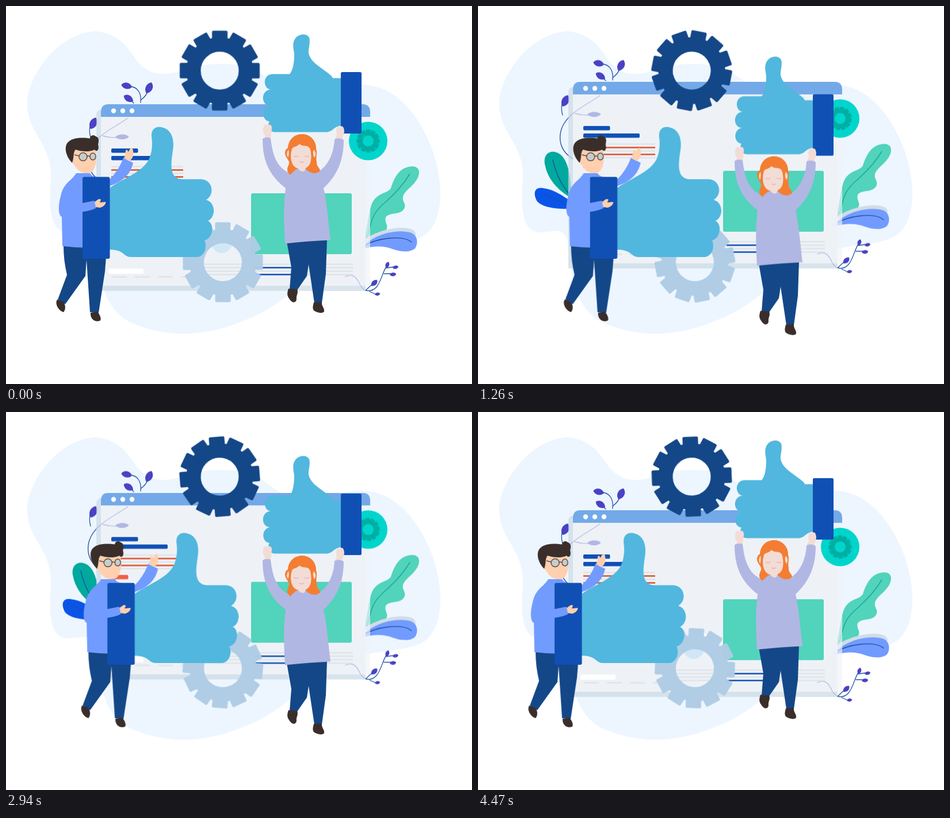
An HTML page that plays this animation: 810 px wide and 658 px high, repeating every 4.5 s.

```html
<!DOCTYPE html>
<html lang="en">
<head>
<meta charset="utf-8">
<title>Thumbs up</title>
<style>
  html, body { margin: 0; width: 100%; height: 100%; overflow: hidden; background: #fff; }
  svg { display: block; width: 810px; height: 658px; }
  svg * { animation-duration: 4.5s; animation-iteration-count: infinite; }
  .float, .push, .lift { animation-timing-function: cubic-bezier(.364, 0, .636, 1); }
  .float { animation-name: float; }
  .push { animation-name: push; }
  .lift { animation-name: lift; }
  .spin { animation-name: spin; animation-timing-function: linear; }
  .back { animation-direction: reverse; }
  @keyframes float {
    0%, 50%, 100% { transform: translateY(0); }
    20% { transform: translateY(-47px); }
    75% { transform: translateY(-45px); }
  }
  @keyframes push {
    0%, 50%, 100% { transform: translateX(0); }
    25%, 75% { transform: translateX(64px); }
  }
  @keyframes lift {
    0%, 50%, 100% { transform: translateY(0); }
    25%, 75% { transform: translateY(40px); }
  }
  @keyframes spin { to { transform: rotate(360deg); } }
  .navy { fill: #144788; }
  .royal { fill: #1050b5; }
  .hand { fill: #51b7de; }
  .mint { fill: #52d3bc; }
  .iris { fill: #729bff; }
  .lilac { fill: #b1b7e3; }
  .skin { fill: #ffcfae; }
  .pale { fill: #f3dcd6; }
  .dark { fill: #3a2e2b; }
  .bud { fill: #4a42c4; }
  .stem { fill: none; stroke: #1c4fa6; stroke-width: 1.3; stroke-linecap: round; }
  .faint { stroke: #b6bde4; }
  .grey { stroke: #dfe5e8; stroke-width: 2.6; }
  .red { stroke: #dd5029; stroke-width: 2.6; }
  .blue { stroke: #1050b5; stroke-width: 2.6; }
</style>
</head>
<body>
<svg viewBox="0 0 810 658">
  <defs>
    <g id="gear"></g>
    <path id="bud" d="M0 0C-6 -4 -7 -14 1 -19C9 -14 7 -4 0 0Z"/>
  </defs>

  <path fill="#edf6ff" d="M155 44C190 46 210 68 223 89C243 120 272 124 305 112C340 99 395 96 430 110C455 121 480 150 515 155C550 155 575 139 612 137C668 134 710 178 735 235C760 292 765 368 730 397C698 424 610 408 555 450C510 482 482 520 420 545C350 576 280 580 215 550C180 533 163 490 160 440C157 375 136 395 105 394C75 390 75 350 78 300C80 240 40 225 37 175C33 130 85 48 155 44Z"/>

  <g class="float">
    <g class="bud">
      <path class="stem" d="M234 168C236 152 229 140 214 140M234 164Q245 156 247 146M222 169L212 160M163 228C136 252 134 288 168 307M147 229Q143 215 148 203"/>
      <use href="#bud" transform="translate(219 141) rotate(-82)"/>
      <use href="#bud" transform="translate(221 166) rotate(-62)"/>
      <use href="#bud" transform="translate(244 152) rotate(22) scale(1.1)"/>
      <use href="#bud" transform="translate(147 214) rotate(22) scale(1.15)"/>
      <path fill="#00a99d" d="M162 373C139 361 121 339 117 318C112 300 122 291 133 293C154 297 161 325 163 373Z"/>
      <path fill="#0a55e8" d="M160 392C137 393 111 390 102 378C95 364 99 354 112 356C132 358 146 369 160 378Z"/>
      <path class="stem" d="M130 307Q138 343 160 368M115 367Q132 376 158 384"/>
      <path class="mint" d="M616 421C628 400 628 365 636 344C645 324 663 327 669 317C674 301 683 281 703 279.500C717 278 720 287 717 296C711 313 693 320 690 332C688 341 697 344 692 353C685 365 666 358 660 368C657 377 667 383 660 391C650 401 632 398 616 421Z"/>
      <path fill="none" stroke="#1aab98" stroke-width="1.5" d="M620 415C640 385 625 370 660 341Q688 316 702 292"/>
      <path fill="#d0dde8" d="M616 412C640 390 690 380 708 390Q714 395 711 400Z"/>
      <path class="iris" d="M615 424C637 397 680 387 705 395C717 401 716 415 711 422C700 431 682 427 666 421C647 416 632 419 615 424Z"/>
      <path class="stem" d="M617 420C645 403 690 398 705 411"/>
      <path class="stem" d="M616 486Q620 493 625 495C650 501 652 466 661 454M625 495L638 483M632 497L645 503M657 466L671 466M661 456L675 454"/>
      <use href="#bud" transform="translate(635 487) rotate(42) scale(.75)"/>
      <use href="#bud" transform="translate(641 502) rotate(80) scale(.5)"/>
      <use href="#bud" transform="translate(661 456) rotate(15) scale(.6)"/>
      <use href="#bud" transform="translate(672 456) rotate(72) scale(.55)"/>
      <use href="#bud" transform="translate(667 468) rotate(78) scale(.6)"/>
    </g>

    <path fill="#cddbe6" opacity=".75" d="M157 190Q157 180 168 180H625V496H157Z"/>
    <path fill="#f1f4f9" opacity=".68" d="M165 193H633V487H165Z"/>
    <path fill="#f0f3f9" opacity=".75" d="M165 193H625V487H165Z"/>
    <path fill="#73a9e8" d="M165 193V185Q165 171 178 171H620Q633 171 633 185V193Z"/>
    <path class="stem faint" d="M212 195C192 209 176 216 163 228M168 226Q186 231 202 228M590 471C604 464 610 474 616 486"/>
    <use href="#bud" class="lilac" transform="translate(190 228) rotate(87) scale(.8 1.25)"/>
    <g fill="#fff">
      <circle cx="187" cy="182.500" r="4.200"/>
      <circle cx="203" cy="182.500" r="4.200"/>
      <circle cx="219" cy="182.500" r="4.200"/>
      <rect x="178" y="457" width="61" height="9" rx="2"/>
    </g>
    <rect class="royal" x="183" y="248" width="46.500" height="7.500" rx="2"/>
    <rect class="royal" x="183" y="261" width="98" height="7.500" rx="2"/>
    <path class="grey" d="M183 279.500H308M183 291.500H308M183 303H308M345 449.500H603M345 455.500H603M345 461.500H603M345 467.500H603"/>
    <path class="red" d="M183 285.500H308M183 297.500H308"/>
    <path class="blue" d="M432 455.500H497M432 467.500H497"/>
    <path class="grey" stroke-dasharray="26 14" d="M184 471.500H330"/>
    <rect x="183" y="314" width="29.500" height="7.500" rx="2" fill="#ef6048"/>
    <circle cx="375" cy="412" r="18" fill="#d0e7f7"/>
    <path fill="#fff" d="M385 382L407 391L385 401Z"/>
    <rect class="mint" x="426" y="326" width="175" height="106" rx="3"/>
    <circle cx="629.500" cy="235" r="33.500" fill="#00d5cc"/>
    <g transform="translate(629.5 235) scale(.29)" fill="#00aea4" stroke="#00aea4"><use href="#gear" class="spin"/></g>
  </g>

  <g transform="translate(371.500 112.500)" fill="#144788" stroke="#144788"><use href="#gear" class="spin"/></g>
  <g transform="translate(377 446)" fill="#aecce5" stroke="#aecce5" opacity=".97"><use href="#gear" class="spin back"/></g>

  <g class="push">
    <path class="navy" d="M100 417L175 424L172 462L161 534L146 533L140 442L138 470L103 519L90 511L106 468Q100 443 100 417Z"/>
    <path class="dark" d="M89 511C84 519 92 531 100 533C105 527 103 517 98 514ZM147 534L159 532C165 540 166 546 163 548C154 551 146 544 147 534Z"/>
    <path class="iris" d="M122 291H146Q150 298 160 298L180 302C192 290 200 276 204 264L221 273C217 291 205 305 181 313L160 420Q130 422 98 418L97 367C90 364 91 345 95 331C100 307 114 305 122 291Z"/>
    <path class="skin" d="M205 265C208 261 207 249 210 250L213 254C215 248 219 245 220 248C223 258 221 266 214 270ZM114 252L155 247C158 265 158 278 150 288C140 294 126 290 121 280L113 270Z"/>
    <path class="dark" d="M115 273C103 261 100 243 109 236C118 228 136 229 146 230.500C146 225 153 223 156 227C163 229 161 237 160 241C163 251 157 255 154 250C144 255 130 253 121 250C116 255 119 262 115 273Z"/>
    <g fill="#c9cdca" stroke="#54504e" stroke-width="1.500">
      <circle cx="134" cy="262.500" r="7"/>
      <ellipse cx="151" cy="262" rx="5" ry="6"/>
      <path fill="none" d="M141 262Q143 260 146 262M127 261L119 259"/>
    </g>
    <path class="hand" d="M179 318C195 303 241 290 250 263C254 252 255 240 253 227C252 211 264 208 274 212C289 217 293 234 290 252C288 266 284 288 294 297Q298 301 305 301.500H338C359 301 364 328 348 337.500C365 342 365 368 351 374C363 380 360 404 345 408C350 418 346 435 333 437H217C204 437 206 424 179 424Z"/>
    <rect class="royal" x="133" y="297.500" width="47.500" height="142.500" rx="3"/>
    <path class="iris" d="M106 341L133 343L153 339Q158 345 156 352C145 357 132 360 112 358Z"/>
    <path class="skin" d="M154 341C159 338 161 334 165 337L163 342L173 341C175 344 168 351 163 351L156 350Z"/>
  </g>

  <g class="lift">
    <path class="navy" d="M488 410L558 406L556 466L549 517L536 517L526 450L523 470L505 496L493 493L496 455Z"/>
    <path class="dark" d="M491 492L506 493C509 500 504 503 505 511C504 517 498 517 494 512C490 506 487 503 491 492ZM535 516L549 515C548 523 554 525 553 532C549 536 541 534 535 530C532 525 534 521 535 516Z"/>
    <path class="hand" d="M584 125.500H568L566 122C551 108 530 100 526 82C525 75 529 67 527.500 57C526 48 512 47 505 54C496 63 500 74 501 84C501 98 499 112 493 118.500H463C446 119 446 144 460 145.500C442 147 443 173 459 173.500C443 176 444 200 458 201C452 212 459 220 469 219.500H555C569 220 567 210 584 208Z"/>
    <rect class="royal" x="582" y="115" width="36" height="107" rx="2.500"/>
    <path class="pale" d="M447 212C449 205 453 204 454 209C457 204 463 207 462 214L460 231L449 232L450 225Q445 219 447 212ZM574 216C575 210 578 208 580 212C584 206 588 211 588 219L584 233L572 231L575 225Z"/>
    <path class="lilac" d="M446 231Q453 227 460 230C463 257 469 279 491 290L505 283H530L541 290C560 279 570 256 571 232Q579 228 587 233C587 267 577 294 552 317C558 343 560 375 564 407.500Q526 409 485 413.500C483 380 482 349 486 317C455 293 446 266 446 231Z"/>
    <path fill="#f47d31" d="M490 247C491 231 503 222 516 223C532 224 540 238 539 249C542 256 538 262 540 271C539 279 546 282 546 287C541 292 533 292 526 288L520 283L508 283C502 285 498 290 494 294C486 286 489 282 492 275C494 268 484 264 485 254Q486 249 490 247Z"/>
    <path class="pale" d="M497 249C499 244 505 246 510 240C516 246 526 240 529 250C532 264 531 278 521 282L519 287Q513 290 508 283C495 280 493 262 497 249ZM491 250Q486 256 490 264Q493 257 491 250ZM535 250Q541 257 536 264Q532 257 535 250Z"/>
    <path fill="none" stroke="#dda49b" d="M500 261Q504 264 508 261M519 261Q523 264 527 261M510 271Q514 274 518 271"/>
  </g>
</svg>
<script>
  const teeth = Array.from({ length: 12 }, (_, i) =>
    `<rect x="-13.5" y="-69.5" width="27" height="20" rx="2.5" stroke="none" transform="rotate(${i * 30})"/>`);
  document.getElementById('gear').innerHTML =
    '<circle r="45.5" fill="none" stroke-width="25"/>' + teeth.join('');
</script>
</body>
</html>
```
